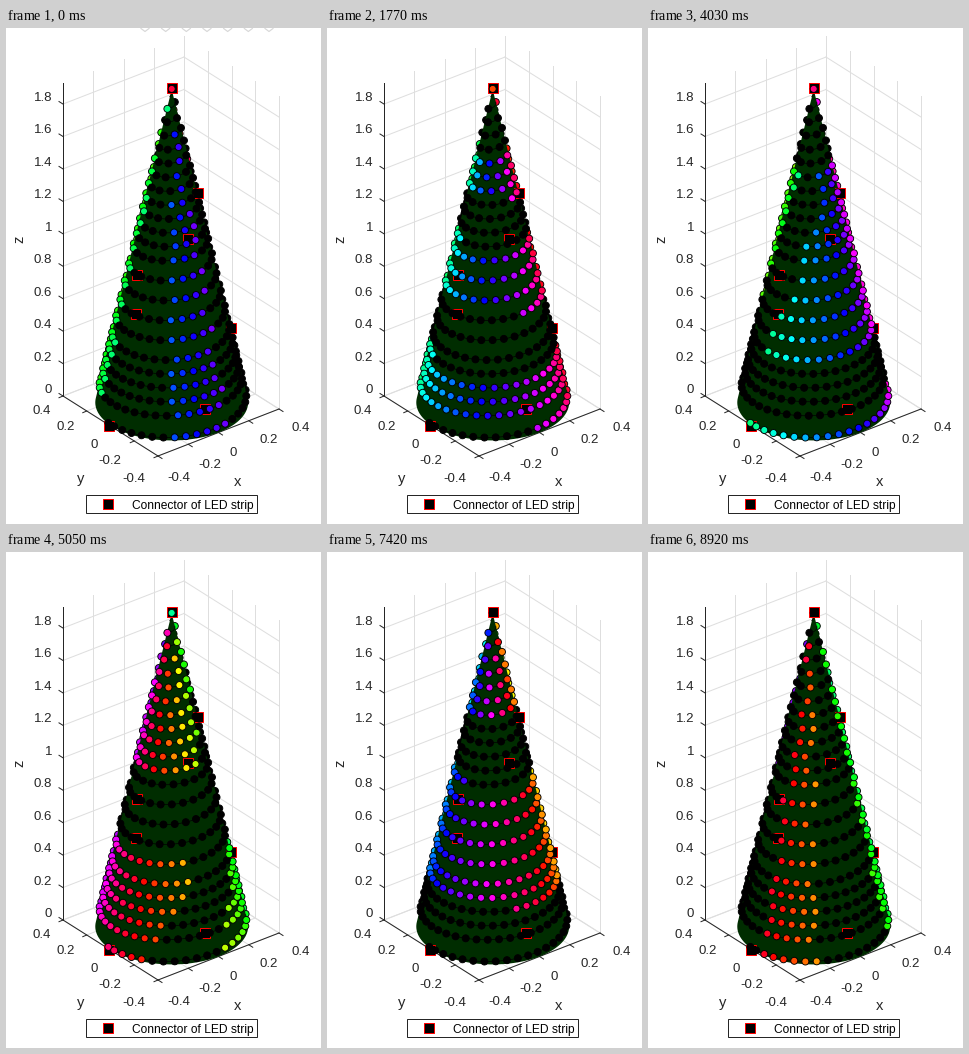
A matplotlib script for the animation above (9.08 s loop, 315x496 px).

```python
import numpy as np
import matplotlib.pyplot as plt
from matplotlib.animation import FuncAnimation
from matplotlib.colors import hsv_to_rgb
from matplotlib.patches import Polygon, Rectangle

W, H, DPI = 315, 496, 100
LOOP, TICK, STEPS = 9080, 20, 85
PX = 72 / DPI
INK, GRID = "#262626", "#dedede"

plt.rcParams["font.family"] = "Liberation Sans"
fig = plt.figure(figsize=(W / DPI, H / DPI), dpi=DPI, facecolor="white")
ax = fig.add_axes([0, 0, 1, 1])
ax.set_xlim(0, W)
ax.set_ylim(H, 0)
ax.axis("off")

# Orthographic projection of the plot box onto the stage
ORIGIN = np.array([165.0, 374.5])
EX, EY, EZ = np.array([[151.25, -58.75], [-118.75, -75.0], [0.0, -162.2]])
HALF, TOP = 0.4, 1.93


def project(x, y, z):
    return ORIGIN + x * EX + y * EY + z * EZ


def line(p, q, color=INK, z=1):
    ax.plot([p[0], q[0]], [p[1], q[1]], color=color, lw=PX, zorder=z)


def text(x, y, s, size, ha="center", color=INK, **kw):
    va = "center" if "rotation" in kw else "center_baseline"
    ax.text(x, y, s, fontsize=size * PX, color=color, ha=ha, va=va, zorder=9, **kw)


def square(x, y, z):
    ax.add_patch(Rectangle((x - 5, y - 5), 10, 10, fc="black", ec="red",
                           lw=PX, zorder=z))


def draw_axes():
    ticks = np.arange(-2, 3) / 5
    for v in ticks:
        line(project(v, HALF, 0), project(v, HALF, TOP), GRID)
        line(project(HALF, v, 0), project(HALF, v, TOP), GRID)
        line(project(v, -HALF, 0), project(v, HALF, 0), GRID)
        line(project(-HALF, v, 0), project(HALF, v, 0), GRID)
    for n in range(10):
        z = n / 5
        left, back = project(-HALF, HALF, z), project(HALF, HALF, z)
        line(left, back, GRID)
        line(back, project(HALF, -HALF, z), GRID)
        line(left, left + (-4, -2.5), z=2)
        text(46, left[1] - 7.5, f"{z:g}", 13.3, "right")

    left, front = project(-HALF, HALF, 0), project(-HALF, -HALF, 0)
    line(left, project(-HALF, HALF, TOP), z=2)
    line(left, front, z=2)
    line(front, project(HALF, -HALF, 0), z=2)
    for n, v in enumerate(ticks):
        px, py = project(v, -HALF, 0), project(-HALF, -v, 0)
        line(px, px + (4, 2.5), z=2)
        line(py, py + (-4, 1.7), z=2)
        text(161 + 31 * n, 448.5 - 12.6 * n, f"{v:g}", 13.3, "left")
        text(45 + 23.5 * n, 381 + 17 * n, f"{ticks[4 - n]:g}", 13.3, "right")
    text(232, 453, "x", 14.7)
    text(75, 450, "y", 14.7)
    text(13, 211, "z", 14.7, rotation=90)


def draw_legend():
    ax.add_patch(Rectangle((79.5, 466.5), 171, 18, fc="white", ec=INK,
                           lw=PX, zorder=8))
    square(102, 476, 9)
    text(126, 477, "Connector of LED strip", 12, "left", color="black")


# Cone: axis on the stage, base radius, and pixel radii of a unit circle
AXIS_X, BASE_R, RX, RY = 165.7, 0.398, 192.0, 95.3

# Spiral: u counts turns, whole numbers pass the front of the tree
U_START, U_END, PITCH = -0.156, 22.35, 0.059


def front_y(u):
    """Height on the stage of the front pass; some turns are wound wider."""
    return 409.5 - 13.9 * u - 8 * np.clip(u, 0, 1) - 6 * np.clip(u - 5, 0, 5)


def spiral(u):
    z = (ORIGIN[1] + RY * BASE_R - front_y(u)) / (RY * BASE_R / TOP - EZ[1])
    r = np.maximum(BASE_R * (1 - z / TOP), 0)
    a = np.pi / 2 - 2 * np.pi * u
    x = AXIS_X + RX * r * np.cos(a)
    y = ORIGIN[1] + EZ[1] * z + RY * r * np.sin(a)
    return x, y, r, np.sin(a) > -0.12


fine = np.linspace(U_START, U_END, 6000)
fx, fy, fr, ffront = spiral(fine)
arc = np.cumsum(2 * np.pi * fr) * (fine[1] - fine[0])
led = np.append(np.interp(np.arange(0, arc[-1], PITCH), arc, fine), U_END)
lx, ly, _, front = spiral(led)
front[-1] = True

draw_axes()
draw_legend()

ang = np.radians(np.linspace(-7, 187, 80))
base = np.column_stack([AXIS_X + RX * BASE_R * np.cos(ang),
                        ORIGIN[1] + RY * BASE_R * np.sin(ang)])
tip = (AXIS_X, ORIGIN[1] + EZ[1] * TOP)
ax.add_patch(Polygon(np.vstack([base, tip]), fc="#002d00", ec="none", zorder=4))
for side, z in ((~ffront, 3), (ffront, 5)):
    ax.plot(np.where(side, fx, np.nan), np.where(side, fy, np.nan),
            color="black", lw=0.7 * PX, zorder=z)

PLUGS = [(103, 398), (199, 381), (225, 300), (130, 286), (131, 247),
         (182, 211), (192, 165), (165.5, 60)]
for x, y in PLUGS:
    square(x, y, 5.5)


def dots(side, z):
    return ax.scatter(lx[side], ly[side], s=(7 * PX) ** 2, c="black",
                      edgecolors="black", linewidths=0.9 * PX, zorder=z)


layers = [(~front, dots(~front, 3.5)), (front, dots(front, 6))]

# Faint window tools, visible only at the very start
tools = [ax.plot([x - 4, x, x + 4], [0.5, 3.5, 0.5], color="#d8d8d8",
                 lw=1.2 * PX, zorder=2)[0]
         for x in np.linspace(139, 263, 7)]

# Scenes by their middle step: pulse waves (period, start, duty) along the
# turns, lit where all of them are on. Short periods give upright stripes,
# long ones give bands.
SCENES = {
    0: [(1 / 3, -0.005, 0.42)],
    17: [(7, 0.1, 0.53)],
    28: [(7, 3.2, 0.5)],
    47: [(1.018, 0.12, 0.84), (16.3, -5.8, 0.735)],
    60: [(10.5, 0.07, 0.35)],
    70: [(11.4, 3.04, 0.6)],
    84: [(1 / 3, -0.13, 0.42)],
}
CLIMB = 0.04       # cycles per step
HUE_STEP = 0.0538  # colour wheel turn per step


def lit(step):
    mid = min(SCENES, key=lambda k: abs(k - step))
    shift = CLIMB * (step - mid)
    waves = [((led - start) / period - shift) % 1 < duty
             for period, start, duty in SCENES[mid]]
    return np.all(waves, axis=0)


def update(i):
    t = (i + 0.5) * TICK
    step = min(round(t * STEPS / LOOP), STEPS - 1)
    hue = (0.61 + led - HUE_STEP * step) % 1
    rgb = hsv_to_rgb(np.column_stack([hue, np.ones_like(hue), lit(step)]))
    for side, layer in layers:
        layer.set_facecolor(rgb[side])
    for tool in tools:
        tool.set_visible(step == 0)
    return [layer for _, layer in layers] + tools


anim = FuncAnimation(fig, update, frames=LOOP // TICK, interval=TICK,
                     repeat=True, repeat_delay=0, blit=False)
plt.show()
```
